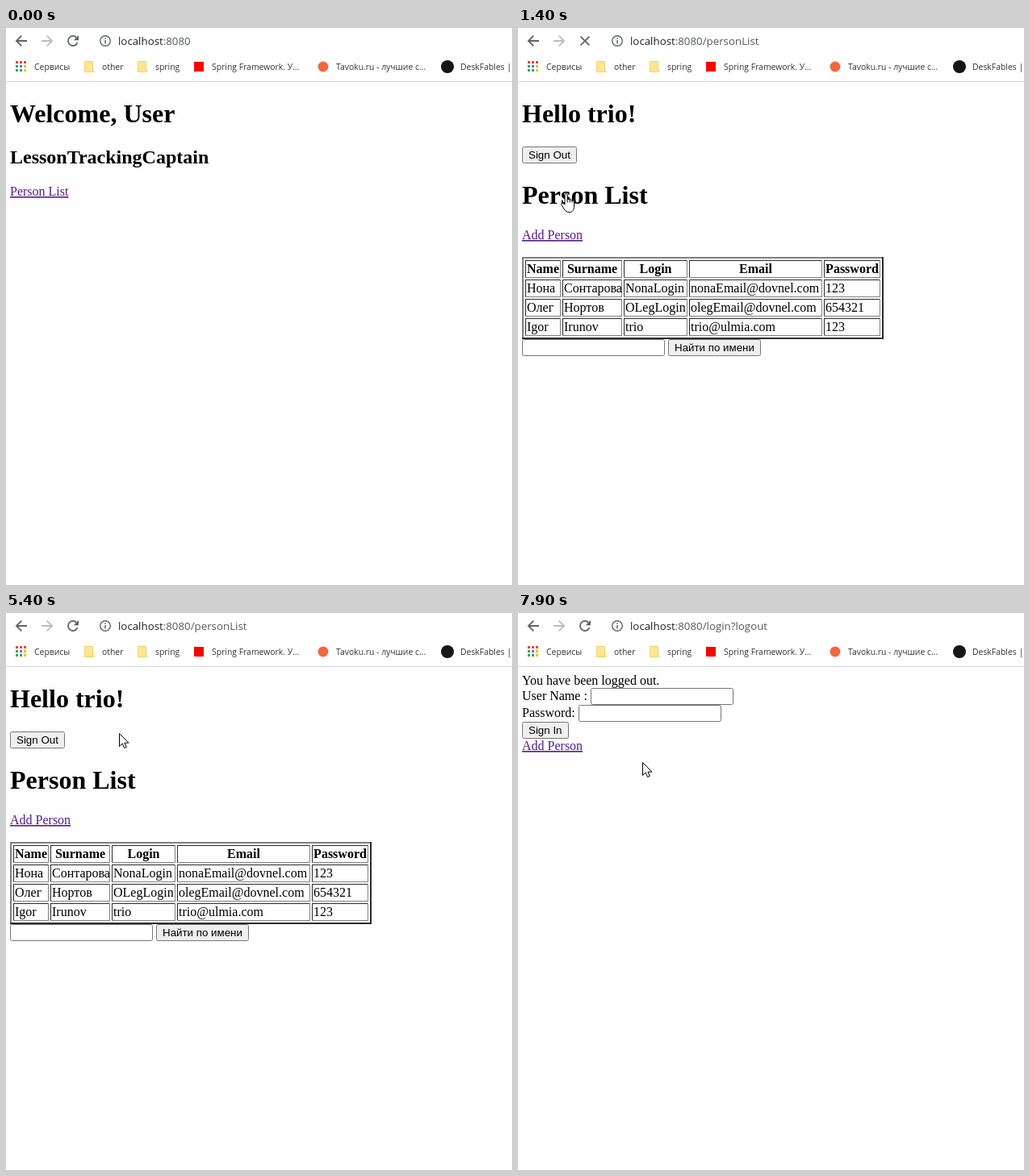
An HTML page that plays this animation: 627x691 px, repeating every 8 s.

```html
<!DOCTYPE html>
<html lang="ru">
<head>
<meta charset="utf-8">
<title>Browser session</title>
<style>
html, body { margin: 0; width: 100%; height: 100%; overflow: hidden; background: #fff; }
svg { display: block; width: 100vw; height: 100vh; }
text { white-space: pre; }
.page { font: 16px "Liberation Serif", "Times New Roman", serif; }
.ui { font: 13.333px "Liberation Sans", Arial, sans-serif; }
.bar { font: 10.4px "Open Sans", "Noto Sans", sans-serif; fill: #303338; }
.url { font: 13.3px "Open Sans", "Noto Sans", sans-serif; fill: #54585d; }
.bold { font-weight: bold; }
.h1 { font-weight: bold; font-size: 32px; }
.h2 { font-weight: bold; font-size: 24px; }
.mid { text-anchor: middle; }
.link { fill: #551a8b; text-decoration: underline 1px; text-underline-offset: 2px; }
.icon { fill: none; stroke: #5f6368; stroke-width: 1.8; }
.btn { fill: #efefef; stroke: #767676; }
.btn.hover { fill: #e5e5e5; stroke: #4f4f4f; }
.field { fill: #fff; stroke: #767676; }
.cursor { fill: #fff; stroke: #000; stroke-linejoin: round; }
</style>
</head>
<body>
<svg id="stage" viewBox="0 0 627 691"></svg>
<script>
const LOOP = 8000;

const text = (x, y, s, cls = '') => `<text x="${x}" y="${y}" class="${cls}">${s}</text>`;
const box = (x, y, w, h, cls, id = '') =>
  `<rect id="${id}" x="${x + .5}" y="${y + .5}" width="${w - 1}" height="${h - 1}" rx="2" class="${cls}"/>`;
const button = (x, y, w, label, id) => box(x, y, w, 21, 'btn', id) + text(x + 8, y + 15, label, 'ui');
const field = (x, y) => box(x, y, 177, 21, 'field');
const path = (d, attrs = '') => `<path d="${d}" ${attrs}/>`;
const group = (id, body, cls = '') => `<g id="${id}" class="${cls}">${body}</g>`;

// Two-tone border: one colour for top and left, another for bottom and right
function bevel(x, y, w, h, b, light, dark) {
  return path(`M${x} ${y}h${w}v${b}H${x + b}V${y + h}h${-b}z`, `fill="${light}"`) +
    path(`M${x + w} ${y + h}h${-w}v${-b}h${w - b}V${y}h${b}z`, `fill="${dark}"`);
}

function table() {
  const cols = [[9, 44], [55, 74], [131, 79], [212, 165], [379, 70]];
  const rows = [
    ['Name', 'Surname', 'Login', 'Email', 'Password'],
    ['Нона', 'Сонтарова', 'NonaLogin', 'nonaEmail@dovnel.com', '123'],
    ['Олег', 'Нортов', 'OLegLogin', 'olegEmail@dovnel.com', '654321'],
    ['Igor', 'Irunov', 'trio', 'trio@ulmia.com', '123']
  ];
  let out = bevel(5, 284, 448, 102, 2, '#808080', '#2c2c2c');
  rows.forEach((row, r) => row.forEach((s, c) => {
    const [x, w] = cols[c], y = 288 + r * 24;
    out += bevel(x, y, w, 22, 1, '#2c2c2c', '#808080');
    out += r ? text(x + 2, y + 16, s) : text(x + w / 2, y + 16, s, 'bold mid');
  }));
  return out;
}

function appsIcon() {
  const hues = { r: '#ea4335', g: '#34a853', b: '#4285f4', y: '#fbbc04' };
  return [...'rrrgbyggy'].map((k, i) =>
    `<rect x="${12 + i % 3 * 5}" y="${41 + Math.floor(i / 3) * 5}" width="3" height="3" fill="${hues[k]}"/>`).join('');
}

const folder = x => path(`M${x + .5} 41.5h10v11h1.5v2h-11.5z`, 'fill="#fee68f" stroke="#f0d070"');

function toolbar() {
  return '<rect width="627" height="67" fill="#fff"/><rect y="66" width="627" height="1" fill="#d5d7da"/>' +
    path('M26 16H13M19.3 9.6L12.9 16l6.4 6.4', 'class="icon"') +
    path('M44 16H57M50.7 9.6L57.1 16l-6.4 6.4', 'class="icon" style="stroke:#babcbe"') +
    group('reload', path('M88.6 18a6 6 0 1 1-1.3-6.2', 'class="icon"') + path('M90 9v6.2h-6.2z', 'fill="#5f6368"')) +
    group('stop', path('M77.6 10.6l10.8 10.8M88.4 10.6L77.6 21.4', 'class="icon"')) +
    '<circle cx="123" cy="16" r="6.3" class="icon" style="stroke-width:1.4"/>' +
    path('M123 15v4.5M123 12.2v1.6', 'class="icon" style="stroke-width:1.5"') +
    '<text x="139" y="21" class="url"><tspan fill="#202124">localhost</tspan>:8080<tspan id="route"></tspan></text>' +
    appsIcon() + folder(97) + folder(163) +
    '<rect x="233" y="42" width="12" height="12" fill="#f00"/>' +
    '<circle cx="393" cy="48" r="6.5" fill="#f4673a"/>' +
    '<circle cx="547" cy="48" r="8" fill="#161616"/>' +
    group('', text(35, 52, 'Сервисы') + text(119, 52, 'other') + text(185, 52, 'spring') +
      text(255, 52, 'Spring Framework. У…') + text(409, 52, 'Tavoku.ru - лучшие с…') +
      text(563, 52, 'DeskFables |'), 'bar');
}

const home = text(5, 117, 'Welcome, User', 'h1') +
  text(5, 168, 'LessonTrackingCaptain', 'h2') +
  text(5, 208, 'Person List', 'link');

const list = text(5, 117, 'Hello trio!', 'h1') + button(5, 147, 68, 'Sign Out', 'signOut') +
  text(5, 218, 'Person List', 'h1') + text(5, 262, 'Add Person', 'link') +
  table() + field(5, 386) + button(186, 386, 115, 'Найти по имени', 'find');

const login = text(5, 89, 'You have been logged out.') +
  text(5, 108, 'User Name :') + field(90, 93) +
  text(5, 129, 'Password:') + field(75, 114) +
  button(5, 135, 58, 'Sign In', 'signIn') + text(5, 170, 'Add Person', 'link');

// Both cursors have their hot spot at 0, 0
const arrow = path('M.5 .5V16.5l3.7-3.5 2.5 5.5 2.6-1.1-2.4-5.3h5.1z');
const hand = path('M-1 14V2a1.6 1.6 0 0 1 3.2 0V8c.5-1 2.8-.8 3 .6 .6-.9 2.7-.6 2.8 .8 .7-.8 2.5-.3 2.5 1.2V16' +
  'c0 4.5-2 7.5-5.5 7.5S0 22.5-1.5 20L-5.2 14.4c-.9-1.7 .9-3 2.3-1.7z') +
  path('M2.2 8v3.5M5.2 8.6V11.5M8 9.4V11.5');

document.getElementById('stage').innerHTML =
  '<rect width="627" height="691" fill="#fefefe"/>' + toolbar() +
  group('home', home, 'page') + group('list', list, 'page') + group('login', login, 'page') +
  group('cursor', group('arrow', arrow) + group('hand', hand), 'cursor');

const $ = id => document.getElementById(id);
const show = (id, on) => $(id).style.display = on ? '' : 'none';
const inside = ([x, y], l, t, r, b) => x >= l && x <= r && y >= t && y <= b;

// Pointer moves: start time, number of 100 ms steps, points passed on the way
const moves = [
  [100, 1, [543, 1]],
  [200, 8, [420, 120], [240, 210], [70, 226], [12, 214], [59, 205]],
  [2500, 4, [170, 222], [315, 230]],
  [3500, 6, [230, 160], [160, 108], [145, 140], [170, 174]],
  [4200, 2, [188, 174]],
  [4500, 8, [240, 228], [270, 190], [200, 121], [124, 135], [134, 160]],
  [5400, 1, [140, 149]],
  [5500, 3, [100, 155], [55, 160]],
  [6100, 1, [54, 160]],
  [6900, 6, [110, 178], [157, 186]],
  [7900, 1, [154, 185]]
];

// Catmull-Rom curve through the points, u in 0..1
function along(pts, u) {
  const last = pts.length - 1;
  const i = Math.min(Math.floor(u * last), last - 1), f = u * last - i;
  const at = k => pts[Math.max(0, Math.min(last, k))];
  return [0, 1].map(n => {
    const [a, b, c, d] = [-1, 0, 1, 2].map(k => at(i + k)[n]);
    return Math.round(b + f / 2 * (c - a + f * (2 * a - 5 * b + 4 * c - d + f * (3 * (b - c) + d - a))));
  });
}

function pointer(t) {
  let pos = [543, -40];
  for (const [start, steps, ...pts] of moves) {
    if (t < start) break;
    const step = Math.min(steps, Math.floor((t - start) / 100) + 1);
    pos = along([pos, ...pts], step / steps);
  }
  return pos;
}

function render(t) {
  const page = t < 1400 ? 'home' : t < 6700 ? 'list' : 'login';
  for (const id of ['home', 'list', 'login']) show(id, id === page);
  $('route').textContent = t < 1200 ? '' : t < 6700 ? '/personList' : '/login?logout';

  const loading = t >= 1200 && t < 1900 || t >= 6500 && t < 6900;
  show('stop', loading);
  show('reload', !loading);

  const pos = pointer(t);
  const onLink = t < 2500 && inside(pos, 5, 195, 78, 212);
  show('hand', onLink);
  show('arrow', !onLink);
  $('cursor').setAttribute('transform', `translate(${pos})`);
  $('signOut').classList.toggle('hover', inside(pos, 5, 147, 73, 168));
}

const begin = performance.now();
function tick() {
  render((performance.now() - begin) % LOOP);
  requestAnimationFrame(tick);
}
tick();
</script>
</body>
</html>
```
